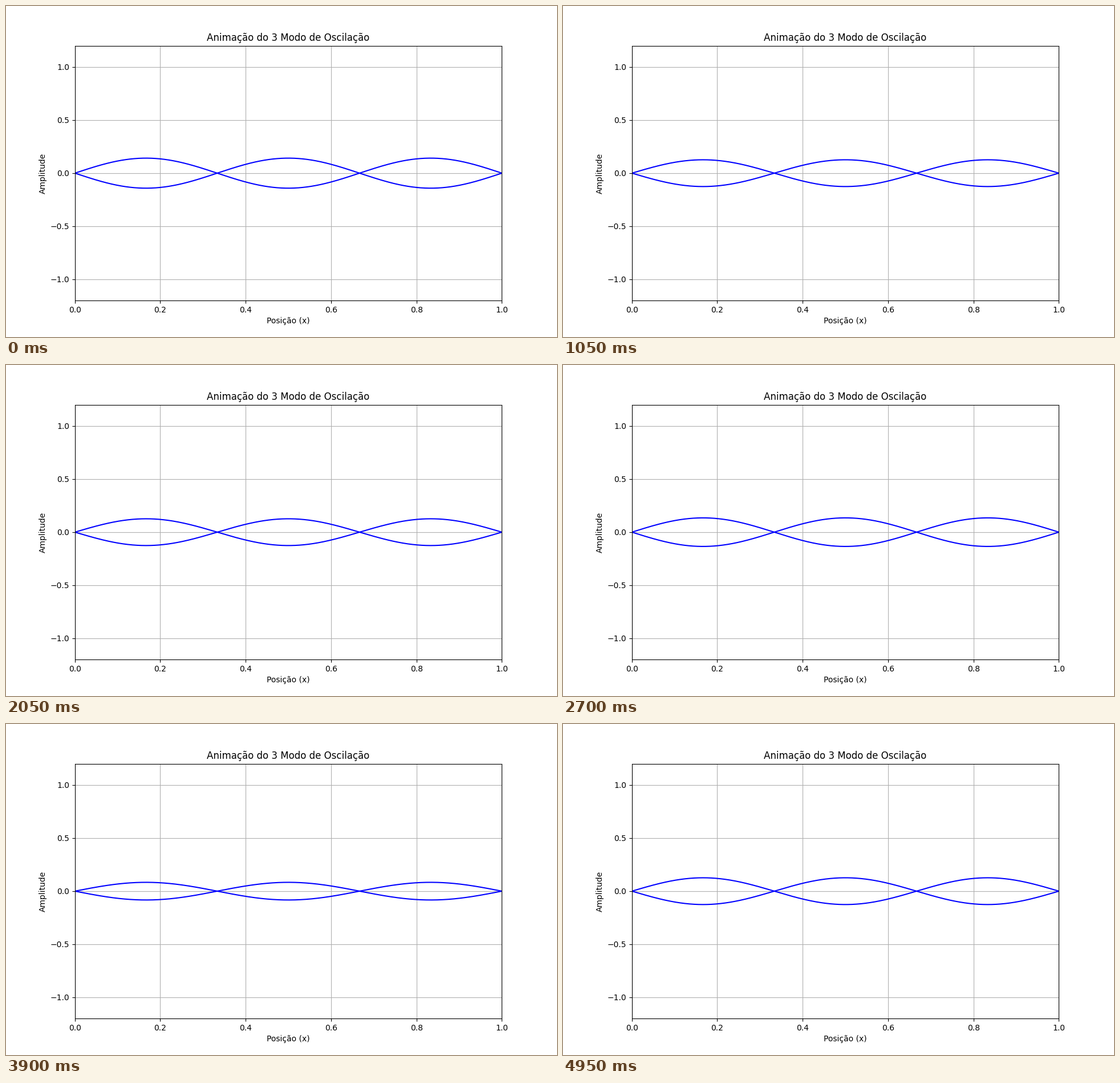
Recreate the animation shown at these times as a matplotlib script. Size 966 px wide and 580 px high, loop 5000 ms.

```python
import numpy as np
import matplotlib.pyplot as plt
from matplotlib.animation import FuncAnimation

MODE = 3
LENGTH = 1.0
SPEED = 1.0
AMPLITUDE = np.sqrt(2) / 10
FRAMES = 100
INTERVAL = 50  # ms

x = np.linspace(0, LENGTH, 1000)
shape = AMPLITUDE * np.sin(MODE * np.pi * x / LENGTH)
omega = MODE * np.pi * SPEED / LENGTH

plt.rcParams["font.family"] = "DejaVu Sans"
fig, ax = plt.subplots(figsize=(9.66, 5.8), dpi=100)
ax.set_xlim(0, LENGTH)
ax.set_ylim(-1.2, 1.2)
ax.set_xlabel("Posição (x)")
ax.set_ylabel("Amplitude")
ax.set_title(f"Animação do {MODE} Modo de Oscilação")
ax.grid(True)

upper, = ax.plot(x, shape, color="blue", lw=1.5)
lower, = ax.plot(x, -shape, color="blue", lw=1.5)


def update(frame):
    t = frame * INTERVAL / 1000
    y = shape * np.cos(omega * t)
    upper.set_ydata(y)
    lower.set_ydata(-y)
    return upper, lower


anim = FuncAnimation(fig, update, frames=FRAMES, interval=INTERVAL,
                     repeat=True, repeat_delay=0, blit=False)
plt.show()
```
